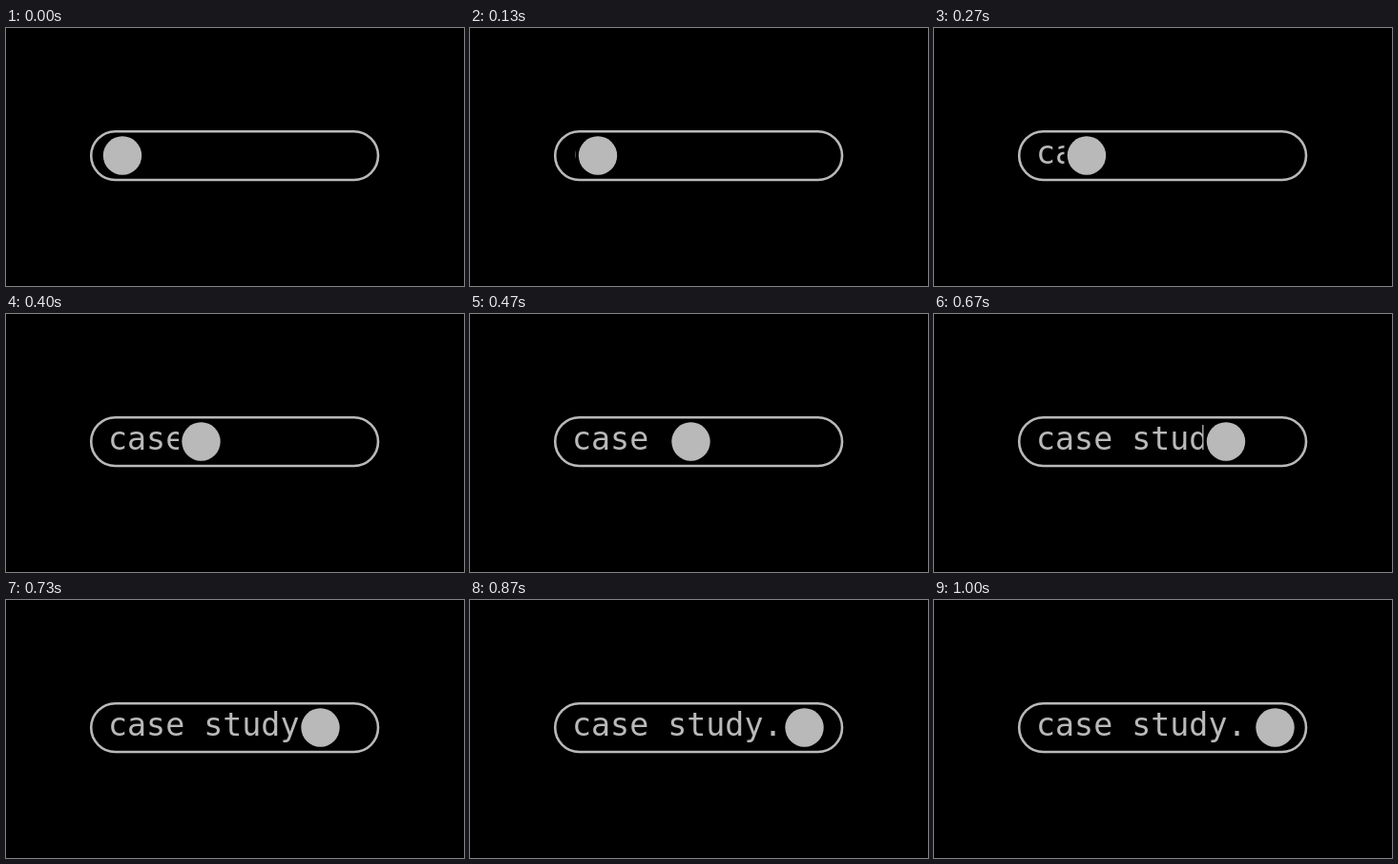
An HTML page with a canvas that plays this animation: 480 px wide and 270 px high, repeating every 1.99 s.

```html
<!DOCTYPE html>
<html lang="en">
<head>
<meta charset="utf-8">
<title>case study.</title>
<style>
html, body { margin: 0; width: 100%; height: 100%; overflow: hidden; background: #000; }
canvas { display: block; width: 480px; height: 270px; }
</style>
</head>
<body>
<canvas id="stage" width="480" height="270"></canvas>
<script>
const ctx = document.getElementById('stage').getContext('2d');
const LOOP = 1990;
const GREY = '#b9b9b9';
const MID_Y = 133.5;
const RADIUS = 20.2;

// Ball centre at each step of a 15 fps clock: slow start, quick middle, soft stop.
const STEPS = [122, 126, 134, 146, 160, 180, 204.5, 231.5,
               263.2, 279.5, 306, 329.5, 341.7, 350.5, 355.7, 357.5];

function ballX(ms) {
  const step = Math.floor((ms + 4) * 15 / 1000);
  return STEPS[Math.min(step, STEPS.length - 1)];
}

function drawPill() {
  ctx.strokeStyle = GREY;
  ctx.lineWidth = 2.6;
  ctx.beginPath();
  ctx.roundRect(89.2, 108.2, 300.8, 50.8, 25.4);
  ctx.stroke();
}

// The words appear only to the left of the ball.
function drawText(edge) {
  ctx.save();
  ctx.beginPath();
  ctx.rect(0, 0, edge, 270);
  ctx.clip();
  ctx.fillStyle = GREY;
  ctx.font = '33.3px "DejaVu Sans Mono", monospace';
  ctx.textBaseline = 'alphabetic';
  ctx.fillText('case study.', 107, 142);
  ctx.restore();
}

function drawBall(x) {
  ctx.fillStyle = GREY;
  ctx.beginPath();
  ctx.arc(x, MID_Y, RADIUS, 0, Math.PI * 2);
  ctx.fill();
}

function draw(ms) {
  const x = ballX(ms);
  ctx.fillStyle = '#000';
  ctx.fillRect(0, 0, 480, 270);
  drawPill();
  drawText(x - RADIUS - 3.3);
  drawBall(x);
}

const start = performance.now();
function tick() {
  draw((performance.now() - start) % LOOP);
  requestAnimationFrame(tick);
}
tick();
</script>
</body>
</html>
```
